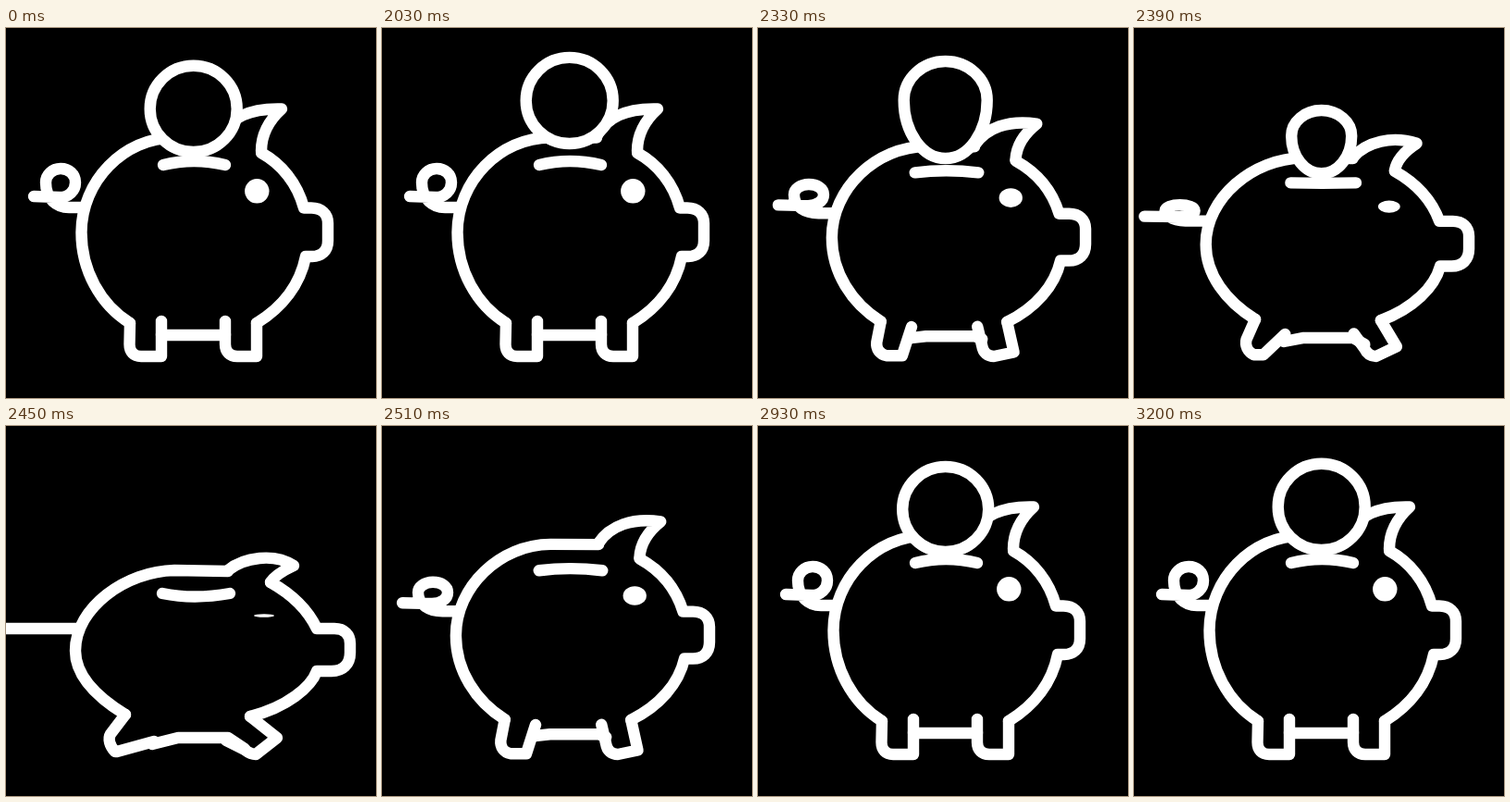
Animation, 400 px wide and 400 px high, one loop 3230 ms. Source, as an HTML page with a canvas:

```html
<!DOCTYPE html>
<html lang="en">
<head>
<meta charset="utf-8">
<title>Piggy bank</title>
<style>
  html, body { margin: 0; width: 100%; height: 100%; overflow: hidden; background: #000; }
  canvas { display: block; width: 100vw; height: 100vh; }
</style>
</head>
<body>
<canvas id="stage" width="400" height="400"></canvas>
<script>
const ctx = document.getElementById('stage').getContext('2d');
const LOOP = 3230, HOLD = 2030, STEP = 30;

// Each part: relaxed path, then the same path fully squashed.
const parts = {
  back: [
    'M134 319 C102 299 81.5 262 81.5 221 C81.5 166 127 118.5 182 118.5 L232 118.5',
    'M129 312 C98 293 75 270 75 243 C75 196 130 157 182 156 L240 157'
  ],
  ear: [
    'M232 117 C243 96 264 86.5 298 87.5 C283 101 276 117 276 133',
    'M240 156 C257 142 290 137 311 151 C296 158 289 164 286 169'
  ],
  face: [
    'M276 135 C298 147 315 168 322 194.5 L330 194.5 C341 194.5 348 201 348 211 L348 230 C348 241 341 247 331 247 L324 247 C318 277 299 302 271 319',
    'M286 169 C311 183 327 200 336 219 L355 219 C366 219 372 226 372 235 L372 245 C372 258 364 265 352 265 L336 265 C330 282 304 304 264 314'
  ],
  hindLeg: [
    'M134 319 L133.5 342 C133.5 350 138 355 146 355 L168 355 L168 317',
    'M129 312 L113 333 C110 338 112 346 118 352 L120 352 L160 341'
  ],
  foreLeg: [
    'M237 317 L237 342 C237 350 242 355 250 355 L271 355 L271 319',
    'M238 340 L258 350 C262 353 266 355 270 355 L293 337 L264 314'
  ],
  belly: [
    'M168 332 L180 332 L232 332 L237 332',
    'M158 344 L186 337 L240 337 L258 349'
  ],
  tail: [
    'M30 182 L58 183 C68 183 75 176 75 167 C75 158 68 152 59 152 C50 152 43 159 43 167 C43 185 55 194 68 194 L82 194',
    'M-2 219 L42 219 C52 219 59 219 59 219 C59 219 52 219 43 219 C34 219 27 219 27 219 C27 219 39 219 58 219 L78 219'
  ],
  slot: ['M170 148 Q203 140 237 148', 'M169 181 Q203 188 242 181']
};

const lerp = (a, b, k) => a + (b - a) * k;
const progress = (t, from, to) => Math.min(1, Math.max(0, (t - from) / (to - from)));

const easeIn = k => k * k;
const easeOut = k => 1 - (1 - k) ** 2;
const easeInOut = k => (1 - Math.cos(Math.PI * k)) / 2;

// time, top, widest, bottom, half width, easing towards this key
const coinKeys = [
  [2003, 40.8, 87.4, 134, 47, easeOut],
  [2188, 8, 54.5, 101, 47, easeOut],
  [2330, 36, 78, 141, 45, easeIn],
  [2450, 176, 180, 184, 12, k => k ** 1.4],
  [2690, 142, 143, 144, 10, easeOut],
  [2790, 20, 66, 112, 47, easeOut],
  [2930, 44, 90, 136, 46.5, easeInOut],
  [3080, 31.5, 78, 124.5, 47, easeInOut],
  [3200, 40.8, 87.4, 134, 47, easeInOut]
];

function coinShape(t) {
  if (t < HOLD || t >= 3200) return coinKeys[0].slice(1, 5);
  if (t >= 2450 && t <= 2690) return null;
  const next = coinKeys.findIndex(key => key[0] > t);
  const a = coinKeys[next - 1], b = coinKeys[next];
  const k = b[5](progress(t, a[0], b[0]));
  return [1, 2, 3, 4].map(i => lerp(a[i], b[i], k));
}

function squashAt(t) {
  return t < 2450
    ? progress(t, 2250, 2450) ** 1.5
    : 1 - easeInOut(progress(t, 2450, 2540));
}

// Ear and tail settle a little later than the body.
function lagAt(t) {
  if (t < 2450) return squashAt(t);
  return Math.max(squashAt(t), 0.18 * (1 - progress(t, 2540, 2690)));
}

function strokePart(name, px, py = px) {
  const number = /-?\d+(\.\d+)?/g;
  const [rest, flat] = parts[name];
  const target = flat.match(number);
  let i = 0;
  const path = rest.replace(number, n => {
    const k = i % 2 ? py : px;
    return lerp(+n, +target[i++], k).toFixed(2);
  });
  ctx.stroke(new Path2D(path));
}

function drawCoin([top, mid, bottom, half]) {
  const x = 202.7;
  ctx.beginPath();
  ctx.ellipse(x, mid, half, mid - top, 0, Math.PI, 2 * Math.PI);
  ctx.ellipse(x, mid, half, bottom - mid, 0, 0, Math.PI);
  ctx.closePath();
  ctx.fillStyle = '#000';
  ctx.fill();
  ctx.stroke();
}

function draw(t) {
  const squash = squashAt(t), lag = lagAt(t), coin = coinShape(t);
  ctx.fillStyle = '#000';
  ctx.fillRect(0, 0, 400, 400);
  ctx.strokeStyle = '#fff';
  ctx.lineWidth = 12.4;
  ctx.lineCap = ctx.lineJoin = 'round';

  for (const name of ['back', 'face', 'hindLeg', 'foreLeg', 'belly']) strokePart(name, squash);
  for (const name of ['ear', 'tail']) strokePart(name, squash, lag);
  if (coin) drawCoin(coin);
  strokePart('slot', squash);

  ctx.fillStyle = '#fff';
  ctx.beginPath();
  ctx.ellipse(lerp(271.3, 279, squash), lerp(176.3, 205, squash),
    lerp(13.2, 11, squash), lerp(13.2, 1.8, squash), 0, 0, 2 * Math.PI);
  ctx.fill();
}

const start = performance.now();
function tick() {
  const t = (performance.now() - start) % LOOP;
  draw(t < HOLD ? 0 : HOLD + Math.floor((t - HOLD) / STEP) * STEP);
  requestAnimationFrame(tick);
}
tick();
</script>
</body>
</html>
```
